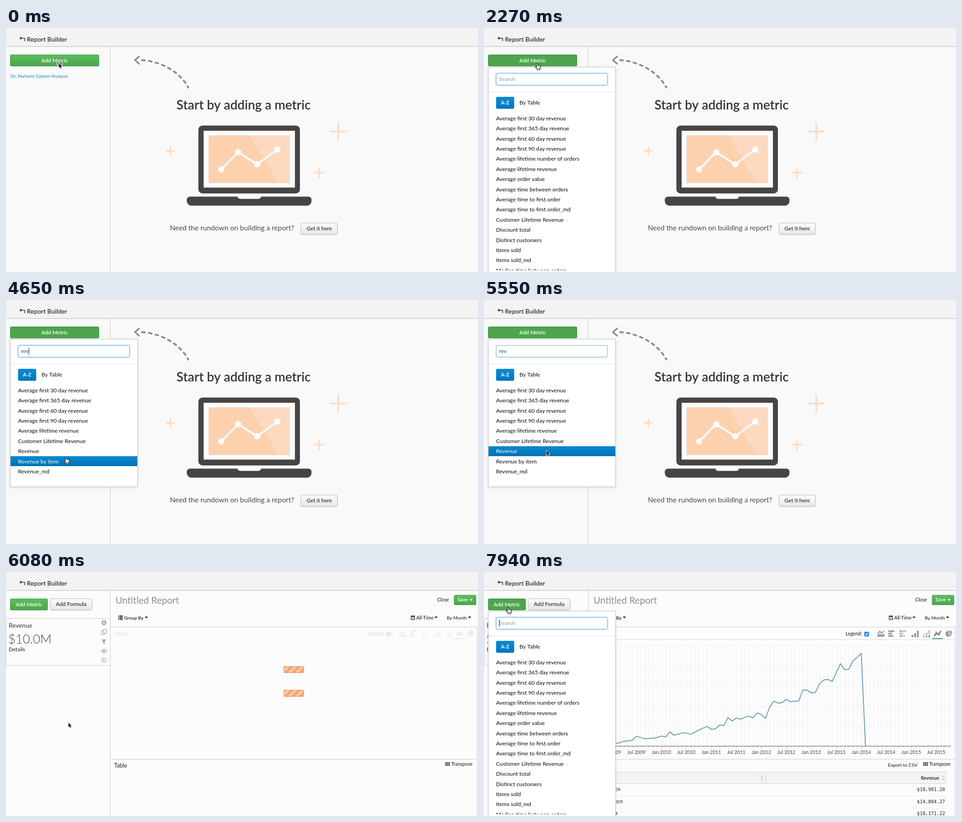
An HTML page with a canvas for the animation above (8 s loop, 1039 px wide and 539 px high).

```html
<!DOCTYPE html>
<html lang="en">
<head>
<meta charset="utf-8">
<title>Report Builder</title>
<style>
html, body { margin: 0; width: 100%; height: 100%; overflow: hidden; background: #f9f9f9; }
canvas { display: block; }
</style>
</head>
<body>
<canvas id="stage" width="1039" height="539"></canvas>
<script>
const ctx = document.getElementById('stage').getContext('2d');
const LOOP = 8000;
const SANS = 'Lato, "Open Sans", sans-serif';
const MONO = '"DejaVu Sans Mono", monospace';

const ALL = ['Average first 30 day revenue', 'Average first 365 day revenue', 'Average first 60 day revenue',
  'Average first 90 day revenue', 'Average lifetime number of orders', 'Average lifetime revenue',
  'Average order value', 'Average time between orders', 'Average time to first order',
  'Average time to first order_md', 'Customer Lifetime Revenue', 'Discount total', 'Distinct customers',
  'Items sold', 'Items sold_md', 'Median time between orders'];
const FOUND = [...ALL.filter(s => /revenue/i.test(s)), 'Revenue', 'Revenue by item', 'Revenue_md'];

// Height of the revenue line for each month from January 2009
const SALES = [381, 378, 377, 373, 373, 371, 362.5, 365.5, 368, 367, 367, 365, 362, 364.5, 353, 360, 358, 355,
  355.5, 358, 353.5, 349, 344.5, 341, 347.5, 346, 337.5, 339, 321, 329, 322, 325, 321, 318, 322, 311, 315, 323,
  298, 285, 289.5, 288, 281, 286.5, 285, 284.5, 260, 260.5, 267, 265.5, 246, 238, 237, 241.5, 222, 202, 215.5,
  214.5, 196, 188, 179.5, 384];
const monthX = i => 280.5 + i * 55 / 6;

// time, x, y, shape
const POINTER = [
  [0, 116, 77, 'arrow'], [1370, 116, 78, 'hand'], [3920, 117, 152, 'hand'], [4070, 119, 238, 'hand'],
  [4220, 124, 316, 'hand'], [4370, 129, 360, 'hand'], [4500, 130, 353, 'hand'], [4650, 131, 347, 'hand'],
  [4800, 135, 341, 'hand'], [4950, 137, 332, 'hand'], [5400, 137, 332, 'arrow'],
  [6380, 131, 308, 'arrow'], [6530, 113, 244, 'arrow'], [6680, 89, 166, 'arrow'], [6830, 67, 110, 'arrow'],
  [7040, 55, 84, 'arrow'], [7190, 52, 77, 'arrow'], [7640, 52, 78, 'hand']
];

const between = (t, a, b) => t >= a && t < b;

function text(s, x, y, size, color = '#222', weight = 400, align = 'left', face = SANS) {
  ctx.font = `${weight} ${size}px ${face}`;
  ctx.textAlign = align;
  ctx.fillStyle = color;
  ctx.fillText(s, x, y);
}
function rect(x, y, w, h, color) {
  ctx.fillStyle = color;
  ctx.fillRect(x, y, w, h);
}
function path(points, fill, stroke, width = 1, closed = !!fill) {
  ctx.beginPath();
  points.forEach(([x, y]) => ctx.lineTo(x, y));
  if (closed) ctx.closePath();
  paint(fill, stroke, width);
}
function paint(fill, stroke, width = 1) {
  if (fill) { ctx.fillStyle = fill; ctx.fill(); }
  if (stroke) { ctx.strokeStyle = stroke; ctx.lineWidth = width; ctx.stroke(); }
}
function round(x, y, w, h, r, fill, stroke, width) {
  ctx.beginPath();
  ctx.roundRect(x, y, w, h, r);
  paint(fill, stroke, width);
}
function dot(x, y, r, fill, stroke, width) {
  ctx.beginPath();
  ctx.arc(x, y, r, 0, 7);
  paint(fill, stroke, width);
}
function fade(y, h, top, bottom) {
  const g = ctx.createLinearGradient(0, y, 0, y + h);
  g.addColorStop(0, top);
  g.addColorStop(1, bottom);
  return g;
}
function shadow(color, blur, y = 0) {
  ctx.shadowColor = color;
  ctx.shadowBlur = blur;
  ctx.shadowOffsetY = y;
}
const noShadow = () => shadow('transparent', 0);
const caretDown = (x, y, c) => path([[x, y], [x + 7, y], [x + 3.5, y + 4]], c);

function greenButton(x, y, w, h, hover) {
  round(x, y + .7, w, h - .7, 3, hover ? '#4ca54c' : fade(y, h, '#5dbf5d', '#4aa54b'));
  round(x + .5, y + 1.2, w - 1, h - 1.7, 3, null, 'rgba(40,110,45,.4)');
}
function greyButton(x, y, w, h, label) {
  shadow('rgba(0,0,0,.12)', 2, 1);
  round(x + .5, y + .5, w - 1, h - 1, 3, fade(y, h, '#fdfdfd', '#e7e7e7'), '#c2c2c2');
  noShadow();
  text(label, x + w / 2, y + 17, 12, '#111', 400, 'center');
}

function header() {
  rect(0, 0, 1039, 40, '#f3f3f3');
  rect(0, 40, 1039, 1.5, '#cbcbcb');
  path([[41, 29], [41, 22.5], [33, 22.5]], null, '#333', 1.6);
  path([[29.5, 22.5], [34, 19], [34, 26]], '#333');
  text('Report Builder', 46, 29.5, 13.8, '#2d2d2d', 600);
}

function plus(x, y, w, h, line) {
  rect(x - w / 2, y - line / 2, w, line, '#fbdfcb');
  rect(x - line / 2, y - h / 2, line, h, '#fbdfcb');
}

function startPage(hover) {
  rect(0, 41, 1039, 498, '#f9f9f9');
  rect(229, 41, 1, 498, '#c9c9c9');
  greenButton(9, 58, 196, 26.5, hover);
  text('Add Metric', 107, 75.5, 11.8, '#fff', 600, 'center');
  text('Or, Perform Cohort Analysis', 9.5, 109.5, 10.3, '#0a84cc');

  path([[294, 62], [284, 71], [294, 80]], null, '#8d8d8d', 3.6);
  ctx.beginPath();
  ctx.moveTo(298, 71);
  ctx.bezierCurveTo(341, 73, 384, 97, 402, 133);
  ctx.setLineDash([9.5, 5.5]);
  paint(null, '#8d8d8d', 4);
  ctx.setLineDash([]);
  text('Start by adding a metric', 523, 180, 28.2, '#333', 600, 'center');

  plus(362, 271.5, 20, 20, 4);
  plus(689, 319.5, 24, 25, 4);
  plus(731.5, 228.5, 38, 40, 4.5);
  round(423.5, 215.5, 223.5, 150, 9, '#454545');
  rect(435, 227, 201, 125.5, '#fcfcfc');
  rect(446, 237, 179, 105.5, '#fdd0ae');
  path([[536, 237], [625, 237], [625, 342.5], [600, 342.5]], '#fcd9bf');
  const nodes = [[473.5, 312.5], [511, 274.5], [553, 301], [597, 268.5]];
  path(nodes, null, '#fcfcfc', 4);
  nodes.forEach(([x, y]) => dot(x, y, 7, '#fcfcfc'));
  round(398, 372.5, 274.5, 20, [7, 7, 10, 10], '#454545');
  round(509.5, 371.5, 52, 6, [0, 0, 6, 6], '#fcfcfc');

  text('Need the rundown on building a report?', 497.5, 447, 15.6, '#4a4a4a', 400, 'center');
  greyButton(649, 430, 81, 26, 'Get it here');
}

function cardIcons() {
  const c = '#a9a9a9', x = 215.5;
  dot(x, 112, 5.5, c);
  path([[x - 2, 110], [x + 2, 114]], null, '#fff', 1.6);
  path([[x + 2, 110], [x - 2, 114]], null, '#fff', 1.6);
  ctx.strokeStyle = c;
  ctx.lineWidth = 1.2;
  ctx.strokeRect(210, 130, 7, 8);
  ctx.fillStyle = '#fcfcfc';
  ctx.fillRect(214, 127, 7, 8);
  ctx.strokeRect(214, 127, 7, 8);
  path([[210, 149], [221, 149], [217, 154], [217, 160], [214, 158], [214, 154]], c);
  ctx.beginPath();
  ctx.ellipse(x, 174.5, 6, 3.8, 0, 0, 7);
  paint(null, c, 1.2);
  dot(x, 174.5, 2.4, c);
  dot(x, 195, 4.8, null, c, 1.5);
  path([[x, 192], [x, 195.5], [x - 2.5, 195.5]], null, c, 1.2);
}

function chartIcons() {
  const c = '#999', bar = (x, y, w, h, k = c) => rect(x, y, w, h, k);
  path([[866, 143], [866, 140], [871, 136], [876, 139], [881, 135], [881, 143]], c);
  path([[866, 137], [871, 131], [875, 135], [881, 130]], null, c, 2.2);
  [13, 8, 11].forEach((w, i) => bar(890, 129 + i * 5.3, w, 3.6));
  [[4, 9], [3, 4], [5, 6]].forEach(([a, b], i) => {
    bar(915, 129 + i * 5.3, a, 3.6);
    bar(916 + a, 129 + i * 5.3, b, 3.6, '#c4c4c4');
  });
  [5, 9, 14].forEach((h, i) => {
    bar(941 + i * 6, 144 - h, 4, h);
    bar(966 + i * 6, 144 - h / 3, 4, h / 3);
    bar(966 + i * 6, 143 - h, 4, h * .6, '#c4c4c4');
  });
  path([[991, 142], [996, 135], [1000, 139], [1006, 130]], null, '#333', 1.6);
  path([[991, 138], [995, 132], [1000, 134], [1005, 141]], null, '#777', 1);
  bar(987, 146, 23, 2, '#25a86b');
  dot(1022.5, 136.5, 6.8, c);
  path([[1023, 136], [1023, 128], [1031, 128], [1031, 136]], '#fcfcfc');
  ctx.beginPath();
  ctx.moveTo(1024.5, 135);
  ctx.arc(1024.5, 135, 6, -Math.PI / 2, 0);
  ctx.fillStyle = c;
  ctx.fill();
  path([[1022.5, 136.5], [1027, 142]], null, '#fcfcfc', 1.2);
}

function chart() {
  rect(230, 149, 807, 1, '#d4d4d4');
  for (let i = 0; i <= 81; i++) {
    rect(Math.round(monthX(i)), 163, 1, 221, '#f0f0f0');
    rect(Math.round(monthX(i)), 385, 1, i % 6 ? 3 : 5, '#b5b5b5');
  }
  ctx.setLineDash([2, 2]);
  for (let i = 0; i < 5; i++) {
    const y = Math.round(163 + i * 44.3) + .5;
    path([[280, y], [1028, y]], null, '#e2e2e2');
  }
  ctx.setLineDash([]);
  rect(280, 384, 748, 1.3, '#777');
  for (let i = 0; i <= 13; i++) {
    text(`${i % 2 ? 'Jul' : 'Jan'} ${2009 + (i >> 1)}`, monthX(i * 6), 402, 10.6, '#444', 400, 'center');
  }
  ctx.lineJoin = 'round';
  path(SALES.map((y, i) => [monthX(i), y + .3]), null, '#5890a8', 1.7);
  ctx.lineJoin = 'miter';
}

function sorter(x) {
  path([[x - 3, 453], [x + 3, 453], [x, 448]], '#cfcfcf');
  path([[x - 3, 456], [x + 3, 456], [x, 461]], '#cfcfcf');
}

function table() {
  text('Export to CSV', 954, 430, 10.4, '#111', 400, 'right');
  rect(238, 442, 781, 25, '#f3f3f3');
  rect(238, 441.5, 781, 1, '#cfcfcf');
  rect(238, 467, 781, 1, '#cfcfcf');
  rect(620, 442, 1, 25, '#cfcfcf');
  sorter(612);
  sorter(1011);
  text('Revenue', 1002, 458.5, 10.5, '#333', 700, 'right');
  [['January', '$18,901.20'], ['February', '$14,804.27'], ['March', '$18,171.22']].forEach(([m, v], i) => {
    const y = 484 + i * 26.6;
    text(`${m} 2009`, 239, y, 10.3);
    text(v, 1015, y, 10.3, '#222', 400, 'right', MONO);
    rect(238, Math.round(y + 10), 781, 1, '#ebebeb');
  });
}

function loader(x, y, t) {
  ctx.save();
  ctx.beginPath();
  ctx.roundRect(x, y, 45, 15, 2);
  ctx.clip();
  rect(x, y, 45, 15, '#f8c9a9');
  const shift = Math.floor((t - 6080) / 150) * 4 % 16;
  for (let i = -2; i < 5; i++) {
    const a = x + i * 16 + shift;
    path([[a, y + 15], [a + 8, y + 15], [a + 23, y], [a + 15, y]], '#f3a56f');
  }
  ctx.restore();
  round(x + .5, y + .5, 44, 14, 2, null, '#e98f52');
}

function reportPage(t, hover) {
  rect(0, 41, 1039, 498, '#fcfcfc');
  greenButton(9, 58, 83, 26.5, hover);
  text('Add Metric', 50.5, 75.5, 11.8, '#fff', 600, 'center');
  greyButton(97, 58, 93, 26, 'Add Formula');
  rect(0, 102, 229, 1, '#cbcbcb');
  rect(0, 206, 229, 1, '#cbcbcb');
  rect(0, 102, 1, 104, '#cbcbcb');
  rect(229, 41, 1, 498, '#c9c9c9');
  text('Revenue', 6, 122.5, 13.7, '#333');
  text('$10.0M', 5, 158, 27.5, '#444', 300);
  text('Details', 6, 175, 11.8);
  cardIcons();

  text('Untitled Report', 241, 70, 20.6, '#8f8f8f');
  text('Close', 949, 65, 10.8, '#111');
  greenButton(986, 50, 49, 23);
  text('Save', 994, 65, 10.9, '#fff', 600);
  caretDown(1020, 60, '#fff');
  for (let i = 0; i < 4; i++) {
    rect(247, 96 + i * 2.7, 2, 1.7, '#222');
    rect(250, 96 + i * 2.7, 7, 1.7, '#222');
  }
  text('Group By', 260, 104.5, 10.2, '#222', 600);
  caretDown(305.5, 98.5, '#222');
  ctx.strokeStyle = '#333';
  ctx.lineWidth = 1;
  ctx.strokeRect(891.5, 97.5, 8, 8);
  rect(891, 97, 9, 2.5, '#333');
  for (let i = 0; i < 3; i++) {
    rect(893 + i * 2.4, 101, 1.2, 3.5, '#666');
    if (i !== 1) rect(893 + i * 2.4, 95, 1.3, 3, '#333');
  }
  text('All-Time', 903, 104.5, 10.5, '#111');
  caretDown(943, 98.5, '#222');
  text('By Month', 1014.5, 104.5, 10.2, '#111', 400, 'right');
  caretDown(1017, 98.5, '#222');
  rect(229, 121, 808, 1, '#cbcbcb');
  rect(229, 413, 808, 1, '#cbcbcb');
  rect(1036.5, 121, 1, 418, '#cbcbcb');

  ctx.globalAlpha = t < 6230 ? .14 : t < 6380 ? .6 : 1;
  text('Chart', 238, 140, 12.3);
  text('Legend:', 796, 140, 10.6, '#111');
  round(837, 132, 10.5, 10.5, 2, '#2f86ee');
  path([[839.5, 137], [841.5, 139.5], [845, 134.5]], null, '#fff', 1.4);
  chartIcons();
  if (t >= 6230) chart();
  ctx.globalAlpha = 1;
  if (t < 6230) [208, 260.5].forEach(y => loader(611, y, t));

  text('Table', 238, 432, 12.4);
  for (let i = 0; i < 9; i++) rect(967 + i % 3 * 3.7, 420 + Math.floor(i / 3) * 3, 2.9, 2.2, '#333');
  text('Transpose', 980, 428, 10.6, '#111');
  if (t >= 6380) table();
}

function menu(list, query, active, caret, glow) {
  const bottom = list === ALL ? 560 : 412;
  shadow('rgba(0,0,0,.13)', 5, 2);
  rect(9, 86, 281, bottom - 86, '#fff');
  noShadow();
  ctx.strokeStyle = '#c3c3c3';
  ctx.lineWidth = 1;
  ctx.strokeRect(9.5, 86.5, 280, bottom - 86);
  shadow(`rgba(82,168,236,${glow})`, 4);
  round(27, 100.5, 244.5, 25.5, 2, '#fff', '#76b5e6', 1);
  noShadow();
  round(27, 100.5, 244.5, 25.5, 2, '#fff', '#76b5e6', 1);
  text(query || 'Search', 33, 117, 12.3, query ? '#444' : '#999');
  ctx.font = `12.3px ${SANS}`;
  if (caret) rect(33 + Math.round(ctx.measureText(query).width), 105, 1, 15.5, '#222');
  rect(10, 141, 279, 1, '#e3e3e3');
  round(26.5, 152, 40, 26.5, 3, fade(152, 26, '#0b8ad5', '#0476bd'));
  text('A-Z', 46.5, 169, 11, '#fff', 700, 'center');
  text('By Table', 78, 169, 12.3, '#111');

  ctx.save();
  ctx.beginPath();
  ctx.rect(9, 180, 281, 355);
  ctx.clip();
  list.forEach((s, i) => {
    const y = 199.5 + i * 22.4;
    if (i === active) rect(10, Math.round(y - 11), 279, 22, fade(y - 11, 22, '#0a88d1', '#0371b4'));
    text(s, 26.5, y + 4.3, 12.25, i === active ? '#fff' : '#080808');
  });
  ctx.restore();
}

function ring(x, y) {
  dot(x, y, 7.6, null, '#fff', 2.2);
  dot(x, y, 8.6, null, '#444', 1);
  dot(x, y, 6.4, null, 'rgba(60,60,60,.55)', .8);
}

function pointer(t) {
  const [, x, y, shape] = POINTER.filter(k => k[0] <= t).pop();
  ctx.save();
  ctx.translate(x, y);
  ctx.lineJoin = 'round';
  if (shape === 'arrow') {
    path([[0, 0], [0, 12], [2.8, 9.4], [4.8, 14], [7, 13], [5, 8.6], [8.4, 8.4]], '#111', '#fff', 1);
  } else {
    ctx.beginPath();
    ctx.moveTo(-.8, 1.4);
    ctx.quadraticCurveTo(.5, -.6, 1.8, 1.4);
    ctx.lineTo(2.5, 5);
    ctx.quadraticCurveTo(4, 3.8, 5, 5.4);
    ctx.quadraticCurveTo(6.5, 4.5, 7, 6.2);
    ctx.quadraticCurveTo(8.6, 5.8, 8.6, 8);
    ctx.quadraticCurveTo(8.6, 11, 7.2, 12.2);
    ctx.lineTo(7, 14.5);
    ctx.lineTo(1.6, 14.5);
    ctx.quadraticCurveTo(.5, 12, -2.6, 9);
    ctx.quadraticCurveTo(-3.2, 7, -1, 7.4);
    ctx.lineTo(.3, 8.4);
    ctx.closePath();
    paint('#fff', '#222', 1.2);
    for (let i = 0; i < 3; i++) path([[2.4 + i * 1.8, 9.5], [2.6 + i * 1.8, 12.5]], null, '#444', .8);
  }
  ctx.restore();
}

function hovered(t) {
  if (t < 4220) return -1;
  return t < 4950 ? 7 : 6;
}

function draw(t) {
  ctx.clearRect(0, 0, 1039, 539);
  if (t < 5700) startPage(t >= 1370);
  else reportPage(t, t >= 7640);
  header();

  if (between(t, 1670, 3170)) {
    menu(ALL, '', -1, between(t, 1820, 2270) || t >= 2870, t < 1820 ? .3 : .6);
  } else if (between(t, 3170, 5700)) {
    menu(FOUND, t < 3470 ? 're' : 'rev', hovered(t), t < 5250, t < 5400 ? .6 : .1);
  } else if (t >= 7790) {
    menu(ALL, '', -1, t >= 7940, t < 7940 ? .3 : .6);
  }

  if (t < 140 || between(t, 920, 1670)) ring(118, 77);
  if (between(t, 7340, 7790)) ring(54, 77);
  pointer(t);
}

function tick() {
  draw(performance.now() % LOOP);
  requestAnimationFrame(tick);
}
tick();
</script>
</body>
</html>
```
